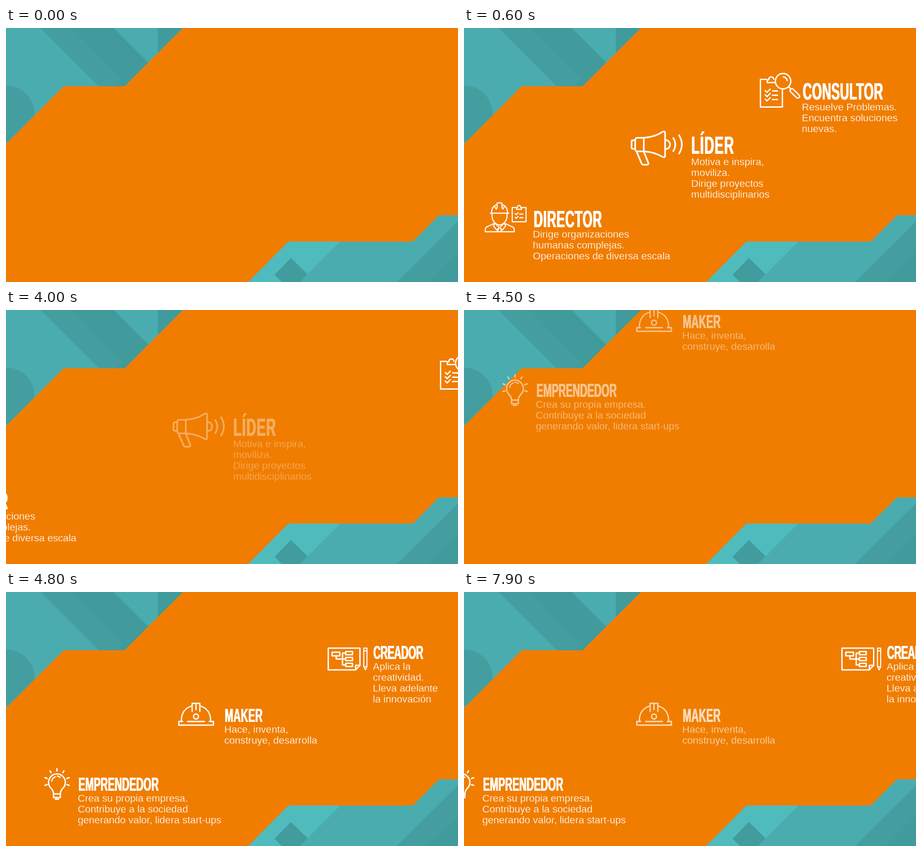
Recreate the animation shown at these times as an HTML page without scripts. Size 998 px wide and 561 px high, loop 8 s.

```html
<!DOCTYPE html>
<html lang="es">
<head>
<meta charset="utf-8">
<title>Perfiles</title>
<style>
  html, body { margin: 0; width: 100%; height: 100%; overflow: hidden; background: #f07d00; }
  .stage { position: absolute; left: 0; top: 0; width: 998px; height: 561px; overflow: hidden; color: #fff;
    font-family: "Liberation Sans", Arial, sans-serif; }
  .scene, .item, svg { position: absolute; left: 0; top: 0; width: 998px; height: 561px; }
  .icon { fill: none; stroke: #fff; stroke-width: 3; stroke-linejoin: round; stroke-linecap: round; }
  .thin { stroke-width: 2.4; }

  /* --x and --y give the left edge and the first baseline */
  h2, p { position: absolute; left: var(--x); top: var(--y); white-space: pre; }
  h2 { margin: -.8465em 0 0; font-size: 52px; line-height: 1; font-weight: 700; letter-spacing: .8px;
    transform: scaleX(.535); transform-origin: 0 0; text-shadow: 1.3px 0, -1.3px 0; }
  .b h2 { font-size: 42px; letter-spacing: 0; text-shadow: 1px 0, -1px 0; }
  p { margin: -19.5px 0 0; font-size: 22.1px; line-height: 24px; -webkit-text-stroke: .32px #f07d00; }

  .slide, .fade, .b, .leave, .dim { animation: 8s step-end infinite; }
  .slide { animation-name: slide; }
  .fade { animation-name: fade; }
  .b { animation-name: drop; }
  .leave { animation-name: leave; }
  .dim { animation-name: dim; }

  /* --d is the distance covered in each tenth of a second on the way out */
  @keyframes slide {
    0% { transform: translateX(calc(var(--d) * 8)); }
    1.25% { transform: translateX(calc(var(--d) * 6.84)); }
    2.5% { transform: translateX(calc(var(--d) * 5.32)); }
    3.75% { transform: translateX(calc(var(--d) * 3.8)); }
    5% { transform: translateX(calc(var(--d) * 2.28)); }
    6.25% { transform: translateX(calc(var(--d) * .76)); }
    7.5% { transform: translateX(0); }
    45% { transform: translateX(0); animation-timing-function: steps(8, start); }
    55%, 100% { transform: translateX(calc(var(--d) * 8)); }
  }
  @keyframes fade {
    0% { opacity: 0; }
    1.25% { opacity: .1; }
    2.5% { opacity: .3; }
    3.75% { opacity: .5; }
    5% { opacity: .7; }
    6.25% { opacity: .9; }
    7.5% { opacity: 1; }
    45% { opacity: 1; animation-timing-function: steps(8, start); }
    55%, 100% { opacity: 0; }
  }
  @keyframes drop {
    0% { opacity: 0; transform: translateY(-515px); }
    53.75% { opacity: .12; transform: translateY(-453px); }
    55% { opacity: .32; transform: translateY(-350px); }
    56.25% { opacity: .55; transform: translateY(-247px); }
    57.5% { opacity: .72; transform: translateY(-144px); }
    58.75% { opacity: .92; transform: translateY(-41px); }
    60%, 100% { opacity: 1; transform: translateY(0); }
  }
  @keyframes leave {
    0% { transform: translateX(0); }
    97.5% { transform: translateX(var(--d)); }
    98.75%, 100% { transform: translateX(calc(var(--d) * 2)); }
  }
  @keyframes dim {
    0% { opacity: 1; }
    97.5% { opacity: .867; }
    98.75%, 100% { opacity: .733; }
  }
</style>
</head>
<body>
<div class="stage">

<svg viewBox="0 0 998 561">
  <clipPath id="corner"><path d="M0 0H390.500L262 128.500H127.500L0 256Z"/></clipPath>
  <g clip-path="url(#corner)">
    <path fill="#4aacae" d="M0 0H391V256H0Z"/>
    <path fill="#449ea0" d="M76 0H145L257 113L243 129H205Z"/>
    <path fill="#419a9b" d="M145 0H238L314 76L262 129H243L257 113ZM335 0H391V56H335Z"/>
    <circle fill="#449ea0" cx="1" cy="189" r="62"/>
  </g>
  <path fill="#4aacae" d="M535 561L623.500 471.800H898L956 413.700H998V561Z"/>
  <path fill="#50bbbd" d="M535 561L623.500 471.800H738L649 561Z"/>
  <path fill="#429b9d" d="M629 508L666 544L649 561H609L593 545Z"/>
  <path fill="#449ea0" d="M998 427V561H863Z"/>
  <path fill="#419a9b" d="M998 495V561H931Z"/>
</svg>

<div class="scene">
  <div class="item slide" style="--d:61px">
    <svg class="icon" viewBox="0 0 998 561">
      <path d="M668 113.500H654.500V174.500H703V137"/>
      <path d="M687 120.500H669.500V117Q669.500 114 673 114Q673 108 678.500 108Q683 108 684 113"/>
      <circle cx="704.500" cy="117.500" r="17"/>
      <path d="M705 108Q712 109 713.500 116M717 130L721 134"/>
      <rect x="-13" y="-4" width="26" height="8" rx="3.500" transform="translate(730.500 144.500) rotate(45)"/>
      <path d="M665 138l4 4l7-7M681 139h11M665 147.500l4 4l7-7M681 148.500h11M665 157l4 4l7-7M681 158h11"/>
    </svg>
    <h2 style="--x:747.500px;--y:158.500px">CONSULTOR</h2>
    <p style="--x:746px;--y:182px">Resuelve Problemas.
Encuentra soluciones
nuevas.</p>
  </div>

  <div class="item fade">
    <svg class="icon" style="stroke-width:3.600" viewBox="0 0 998 561">
      <path d="M383 242.500H397Q421 241 439 229Q444 227 444 232V282Q444 287 439 285Q421 274 397 272.500H383Q378 272.500 378 267V248Q378 242.500 383 242.500ZM397 242.500V272.500"/>
      <path d="M378 248H373Q370 248 370 251V264Q370 267 373 267H378"/>
      <path d="M381 273L392 299Q393 302 396 302H404Q408 302 407 298L397 273"/>
      <path d="M445 247Q455 249 455 257.500Q455 266 445 268M462 243Q471 257.500 462 272M475 237Q487 257.500 475 277"/>
    </svg>
    <h2 style="--x:502px;--y:279px;font-size:55px;letter-spacing:2.500px">LÍDER</h2>
    <p style="--x:501.500px;--y:303px">Motiva e inspira,
moviliza.
Dirige proyectos
multidisciplinarios</p>
  </div>

  <div class="item slide" style="--d:-60px">
    <svg class="icon thin" viewBox="0 0 998 561">
      <path d="M58 409H99M61 408Q61 394 73 390M96 408Q96 394 84 390M73 398V387Q78.500 385 84 387V398M67 393L71 400M90 393L86 400"/>
      <path d="M62 411Q61 422 67 429Q73 435 78.500 435Q84 435 90 429Q96 422 95 411"/>
      <path d="M47 450V445Q47 440 53 438L68 431L78.500 441L89 431L104 438Q111 440 111 445V450ZM68 431L65 437L72 446L78.500 441L85 446L92 437L89 431M76 443L74 450M81 443L83 450"/>
      <path d="M116 396.500H106.500V428H137V396.500H127M116 400.500V396.500H118Q118 392 121.500 392Q125 392 125 396.500H127V400.500Z"/>
      <path d="M113 410l2.500 2.500l4-4.500M123 411h7M113 418l2.500 2.500l4-4.500M123 419h7"/>
    </svg>
    <h2 style="--x:153.500px;--y:440px;letter-spacing:1.500px">DIRECTOR</h2>
    <p style="--x:152px;--y:463.500px">Dirige organizaciones
humanas complejas.
Operaciones de diversa escala</p>
  </div>
</div>

<div class="scene b">
  <div class="item leave" style="--d:61.500px">
    <svg class="icon" viewBox="0 0 998 561">
      <path d="M772 172H711.500V124H781.500V162L772 172V162H781.500"/>
      <path d="M720 133H737V141H720ZM750 131.500H765V138.500H750ZM750 144.500H765V151.500H750ZM750 157.500H765V164.500H750Z"/>
      <path d="M729 141V148H750M750 135H743V161H750"/>
      <path class="thin" d="M790 124H797V165L793.500 172L790 165ZM790 130H797M790 165H797"/>
    </svg>
    <h2 style="--x:810.500px;--y:149px;letter-spacing:-1px">CREADOR</h2>
    <p style="--x:810px;--y:172px">Aplica la
creatividad.
Lleva adelante
la innovación</p>
  </div>

  <div class="item dim">
    <svg class="icon" style="stroke-width:2.800" viewBox="0 0 998 561">
      <path d="M390 286H381.500V294H458V286H449M401 286H438"/>
      <path d="M387 286Q387 258 411 251.500M452 286Q452 258 428 251.500M411 264V246H428V264M419.500 247V260"/>
      <circle cx="419.500" cy="275" r="5.500"/>
    </svg>
    <h2 style="--x:482.500px;--y:288px;letter-spacing:.5px">MAKER</h2>
    <p style="--x:482px;--y:311px">Hace, inventa,
construye, desarrolla</p>
  </div>

  <div class="item leave" style="--d:-59px">
    <svg class="icon" viewBox="0 0 998 561">
      <path d="M105 446Q105 440 100 434A18.500 18.500 0 1 1 125 434Q120 440 120 446V454H105ZM105 446H120M109 457.500H116"/>
      <path class="thin" d="M101 418A12 12 0 0 1 109 408M113 406.500Q117 407 120 409.500"/>
      <path d="M112.500 390V395M97 395L99.500 399M128 395L125.500 399M86 410L91 412M139.500 410L134.500 412M86 427L91 425.500M139.500 427L134.500 425.500"/>
    </svg>
    <h2 style="--x:159.500px;--y:440px">EMPRENDEDOR</h2>
    <p style="--x:158.500px;--y:463px">Crea su propia empresa.
Contribuye a la sociedad
generando valor, lidera start-ups</p>
  </div>
</div>

</div>
</body>
</html>
```
